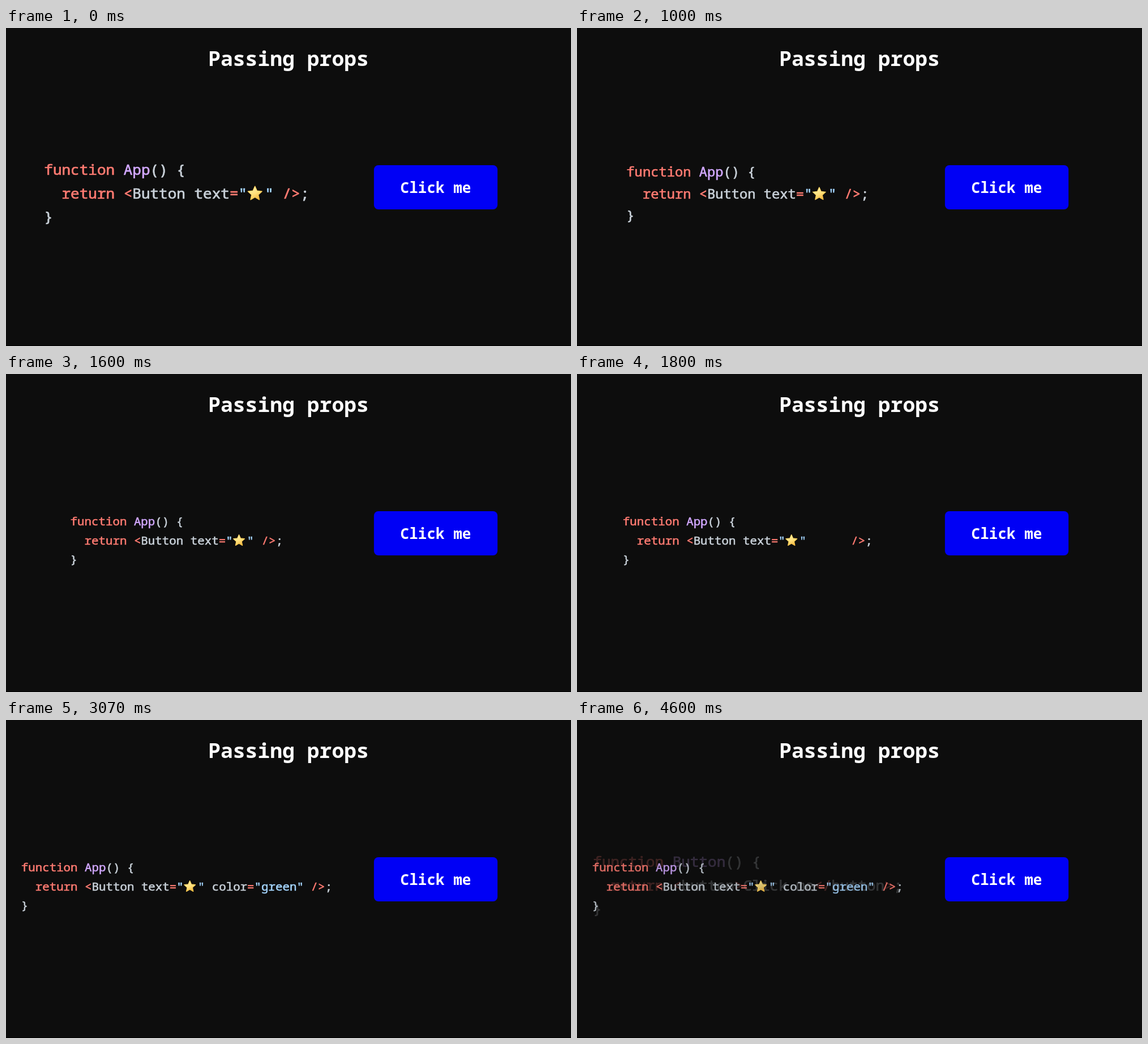
Animation of 998 by 561 pixels, one loop 4670 ms. Source, as an HTML page with a canvas:

```html
<!DOCTYPE html>
<html lang="en">
<head>
<meta charset="utf-8">
<title>Passing props</title>
<style>
  html, body { margin: 0; width: 100%; height: 100%; overflow: hidden; background: #0d0d0d; }
  canvas { display: block; }
</style>
</head>
<body>
<canvas id="stage" width="998" height="561"></canvas>
<script>
const ctx = document.getElementById('stage').getContext('2d');
const FONT = '"Noto Sans Mono", "DejaVu Sans Mono", monospace';
const LOOP = 4670, FPS = 15, LAST_STEP = 69;
const CELL = 0.6, LINE = 1.6, WEIGHT = 0.028;   // in units of the font size
const CODE_X = 301.3, CODE_Y = 300.5;           // centre and middle baseline
const BIG = 26, SMALL = 20.8;
const KEY = '#ff7b72', NAME = '#d2a8ff', STR = '#a5d6ff', PLAIN = '#c9d1d9';
const STAR = '⭐';

const clamp = v => Math.min(1, Math.max(0, v));
const ease = v => v < 0.5 ? 4 * v ** 3 : 1 - (2 - 2 * v) ** 3 / 2;
const tween = (t, start) => ease(clamp((t - start) / 1000));

// A token is [text, colour, opacity = 1, cells = text length].
const appCode = (room, fade) => {
  const color = fade > 0
    ? [[' color', PLAIN, fade], ['=', KEY, fade], ['"green"', STR, fade]]
    : [['', PLAIN, 1, room * 14]];
  return [
    [['function ', KEY], ['App', NAME], ['() {', PLAIN]],
    [['  return ', KEY], ['<', KEY], ['Button text', PLAIN], ['=', KEY], ['"', STR],
     [STAR, STR, 1, 2], ['"', STR], ...color, [' />', KEY], [';', PLAIN]],
    [['}', PLAIN]]
  ];
};

const buttonCode = [
  [['function ', KEY], ['Button', NAME], ['() {', PLAIN]],
  [['  return ', KEY], ['<', KEY], ['button', PLAIN], ['>', KEY], ['Click me', PLAIN],
   ['</', KEY], ['button', PLAIN], ['>', KEY], [';', PLAIN]],
  [['}', PLAIN]]
];

const cells = ([text, , , width = text.length]) => width;
const lineCells = line => line.reduce((sum, token) => sum + cells(token), 0);

function drawStar(x, y, size) {
  const cx = x + 0.525 * size, cy = y - 0.315 * size, r = 0.5 * size;
  const fill = ctx.createLinearGradient(cx - r * 0.5, cy - r, cx + r * 0.5, cy + r);
  fill.addColorStop(0, '#fff0a8');
  fill.addColorStop(0.5, '#ffe07a');
  fill.addColorStop(1, '#f4a92c');
  ctx.beginPath();
  for (let i = 0; i < 10; i++) {
    const a = i * Math.PI / 5 - Math.PI / 2, d = i % 2 ? r * 0.47 : r;
    ctx.lineTo(cx + d * Math.cos(a), cy + d * Math.sin(a));
  }
  ctx.closePath();
  ctx.fillStyle = fill;
  ctx.strokeStyle = '#f8c649';
  ctx.lineWidth = 0.06 * size;
  ctx.stroke();
  ctx.fill();
}

function drawCode(lines, size, opacity) {
  const cell = CELL * size;
  const left = CODE_X - Math.max(...lines.map(lineCells)) * cell / 2;
  ctx.font = `${size}px ${FONT}`;
  ctx.textAlign = 'left';
  ctx.lineJoin = 'round';
  lines.forEach((line, row) => {
    const y = CODE_Y + (row - 1) * LINE * size;
    let x = left;
    for (const token of line) {
      const [text, color, alpha = 1] = token;
      ctx.globalAlpha = opacity * alpha;
      if (text === STAR) {
        drawStar(x, y, size);
      } else {
        ctx.fillStyle = ctx.strokeStyle = color;
        ctx.lineWidth = WEIGHT * size;
        ctx.fillText(text, x, y);
        ctx.strokeText(text, x, y);
      }
      x += cells(token) * cell;
    }
  });
  ctx.globalAlpha = 1;
}

function drawLabel(text, x, y, size) {
  ctx.font = `bold ${size}px ${FONT}`;
  ctx.textAlign = 'center';
  ctx.fillStyle = '#fff';
  ctx.fillText(text, x, y);
}

function drawScene(t) {
  ctx.fillStyle = '#0d0d0d';
  ctx.fillRect(0, 0, 998, 561);
  ctx.fillStyle = '#000';
  ctx.fillRect(0, 560, 998, 1);
  drawLabel('Passing props', 499, 67, 36.4);

  ctx.fillStyle = '#0000f5';
  ctx.beginPath();
  ctx.roundRect(649.9, 242, 218.3, 78, 8);
  ctx.fill();
  drawLabel('Click me', 759, 291, 26);

  const size = BIG + (SMALL - BIG) * tween(t, 525);
  const insert = tween(t, 1533);
  const swap = tween(t, 4250);
  if (swap > 0) drawCode(buttonCode, BIG, swap);
  drawCode(appCode(clamp(insert / 0.2), clamp((insert - 0.35) / 0.65)), size, 1 - swap);
}

const start = performance.now();
function tick() {
  const t = (performance.now() - start) % LOOP;
  const step = Math.min(LAST_STEP, Math.floor((t + 4) * FPS / 1000));
  drawScene(step * 1000 / FPS);
  requestAnimationFrame(tick);
}
tick();
</script>
</body>
</html>
```
